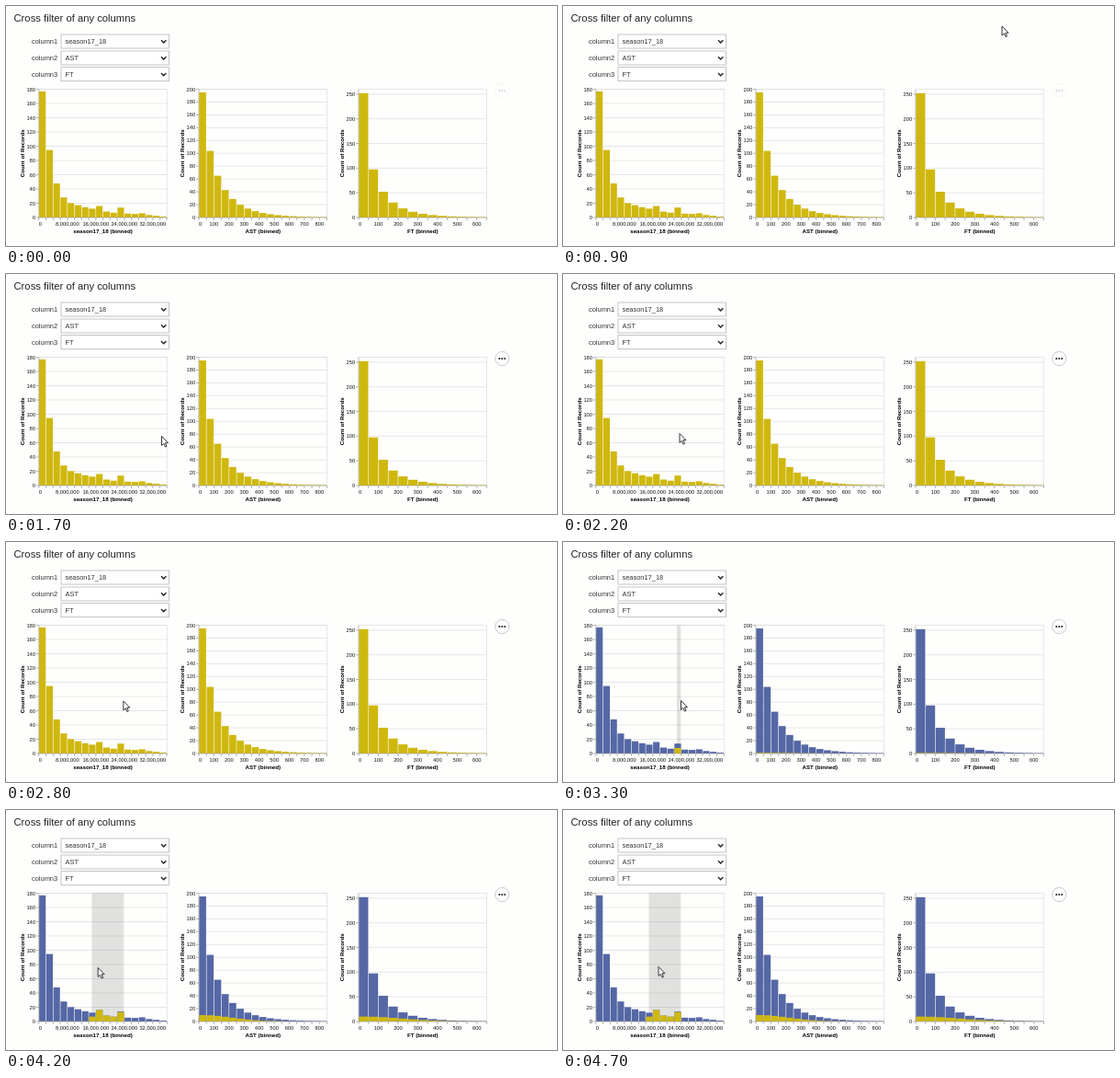
An HTML page that plays this animation: 600x261 px, repeating every 5300 ms.

```html
<!DOCTYPE html>
<html lang="en">
<head>
<meta charset="utf-8">
<title>Cross filter</title>
<style>
html, body { margin: 0; width: 100%; height: 100%; overflow: hidden; background: #fefefd; }
svg { display: block; width: 100%; height: 100%; font-family: "Liberation Sans", Arial, sans-serif; }
.title { font-size: 11.25px; fill: #222; }
.form { font-size: 7.45px; fill: #333; }
.axis { font-size: 5.75px; fill: #111; }
.name { font-size: 6.2px; font-weight: bold; fill: #000; text-anchor: middle; }
</style>
</head>
<body>
<svg id="stage" viewBox="0 0 600 261"></svg>
<script>
const LOOP = 5300, SIZE = 139.5, TOP = 90.5, BASE = TOP + SIZE;
const GOLD = '#cfb80d', BLUE = '#5567a5';
const BRUSH = { begin: 3300, finish: 3500, from: 124, to: 93.5, end: 128.3 };

const decay = (peak, rate, power) => i => peak * Math.exp(-rate * i ** power);

// a steep fall, a slow slope and a ripple around the tenth bin
const salaries = i => decay(155, 0.74, 1.2)(i) + 22 * (1 - i / 18) +
  6 * Math.cos((i - 2) * Math.PI * 2 / 3) * Math.exp(-(((i - 10) / 3) ** 2));

const charts = [
  { name: 'season17_18', left: 35.8, max: 180, yStep: 20, bin: 2e6, count: 18, labelEvery: 4, value: salaries },
  { name: 'AST', left: 210, max: 200, yStep: 20, bin: 50, count: 17, labelEvery: 2, value: decay(195, 0.63, 0.8) },
  { name: 'FT', left: 384, max: 260, yStep: 50, bin: 50, count: 13, labelEvery: 2, value: decay(252, 0.95, 0.73) }
];

// time, x, y
const pointerPath = [
  [900, 478, 22], [1200, 341, 97.5], [1400, 226, 160], [1700, 169.5, 176.5], [2200, 127, 173.5],
  [3300, 128.5, 172.5], [3500, 99, 171.5], [4400, 100.5, 171.5], [4700, 104, 170.5]
];

const clamp = v => Math.min(1, Math.max(0, v));
const mix = (a, b, k) => a + (b - a) * k;
const rect = (x, y, w, h, attrs) => `<rect x="${x}" y="${y}" width="${w}" height="${h}" ${attrs}/>`;
const line = (d, color, width = 0.7) => `<path d="${d}" fill="none" stroke="${color}" stroke-width="${width}"/>`;
const text = (x, y, cls, label, attrs = '') => `<text x="${x}" y="${y}" class="${cls}" ${attrs}>${label}</text>`;

function dropdown(label, value, y) {
  return text(28, y + 10.2, 'form', label) +
    rect(60, y, 117.6, 15, 'fill="#fff" stroke="#aaa" stroke-width=".7"') +
    text(64.5, y + 10.2, 'form', value) +
    line(`M169 ${y + 6.2}l2.7 2.8l2.7-2.8`, '#222', 1.4);
}

function frame({ left, max, yStep }) {
  let out = rect(left, TOP, SIZE, SIZE, 'fill="none" stroke="#ddd" stroke-width=".7"');
  for (let v = 0; v <= max; v += yStep) {
    out += line(`M${left} ${BASE - v / max * SIZE}h${SIZE}`, '#ddd');
  }
  return out;
}

function axes({ name, left, max, yStep, bin, count, labelEvery }) {
  let out = line(`M${left} ${TOP}V${BASE}h${SIZE}`, '#999', 0.5);
  for (let v = 0; v <= max; v += yStep) {
    const y = BASE - v / max * SIZE;
    out += line(`M${left} ${y}h-3`, '#999') +
      text(left - 3.8, y + 2, 'axis', v, 'text-anchor="end"');
  }
  for (let i = 0; i <= count; i++) {
    const x = left + i * SIZE / count;
    out += line(`M${x} ${BASE}v3`, '#999');
    if (i % labelEvery === 0 && i < count) {
      out += text(x, 239, 'axis', (i * bin).toLocaleString('en-US'), `text-anchor="${i ? 'middle' : 'start'}"`);
    }
  }
  return out + text(left + SIZE / 2, 246.6, 'name', `${name} (binned)`) +
    text(0, 0, 'name', 'Count of Records', `transform="translate(${left - 16} ${TOP + SIZE / 2}) rotate(-90)"`);
}

function bars({ left, max, count }, value, color) {
  const step = SIZE / count;
  return Array.from({ length: count }, (_, i) => {
    const height = value(i) / max * SIZE;
    return rect(left + i * step + 0.3, BASE - height, step - 0.6, height, `fill="${color}"`);
  }).join('');
}

// brushed bins count by their overlap; the other charts get a bell-shaped share
function selected(chart, start) {
  const step = SIZE / chart.count;
  const share = (BRUSH.end - start) / (BRUSH.end - BRUSH.to);
  if (chart !== charts[0]) {
    return i => Math.min(chart.value(i), 10 * share * Math.exp(-((i / 5.5) ** 2)));
  }
  return i => {
    const x = chart.left + i * step;
    return chart.value(i) * clamp((Math.min(BRUSH.end, x + step) - Math.max(start, x)) / step);
  };
}

const stage = document.getElementById('stage');
stage.innerHTML =
  text(8.5, 17, 'title', 'Cross filter of any columns') +
  dropdown('column1', 'season17_18', 31) +
  dropdown('column2', 'AST', 49) +
  dropdown('column3', 'FT', 66.7) +
  charts.map(frame).join('') +
  '<g id="marks"></g>' +
  charts.map(axes).join('') +
  `<g id="menu">
    <circle cx="540.3" cy="92" r="7.6" fill="#fff" stroke="#b4b4b4" stroke-width=".7"/>
    ${[-3, 0, 3].map(dx => `<circle cx="${540.3 + dx}" cy="92" r="1.05" fill="#222"/>`).join('')}
  </g>
  <path id="pointer" d="M0 0V10L2.3 7.9L4 11.6L5.5 10.9L3.9 7.2H7Z" fill="#fff" stroke="#222" stroke-width=".9" stroke-linejoin="round"/>`;

const marks = document.getElementById('marks');
const menu = document.getElementById('menu');
const pointer = document.getElementById('pointer');

function drawMarks(time) {
  if (time < BRUSH.begin) {
    marks.innerHTML = charts.map(c => bars(c, c.value, GOLD)).join('');
    return;
  }
  const progress = clamp((time - BRUSH.begin) / (BRUSH.finish - BRUSH.begin));
  const start = mix(BRUSH.from, BRUSH.to, progress);
  marks.innerHTML =
    rect(start, TOP, BRUSH.end - start, SIZE, 'fill="#333" fill-opacity=".14"') +
    charts.map(c => bars(c, c.value, BLUE) + bars(c, selected(c, start), GOLD)).join('');
}

function drawPointer(time) {
  const next = pointerPath.findIndex(p => p[0] > time);
  pointer.setAttribute('visibility', next ? 'visible' : 'hidden');
  if (!next) return;
  const b = pointerPath.at(next);
  const a = next < 0 ? b : pointerPath[next - 1];
  const k = a === b ? 0 : (time - a[0]) / (b[0] - a[0]);
  pointer.setAttribute('transform', `translate(${mix(a[1], b[1], k)} ${mix(a[2], b[2], k)})`);
}

let shownTime;

function draw(now) {
  const time = Math.floor(now % LOOP / 100) * 100;
  if (time === shownTime) return;
  shownTime = time;
  drawMarks(time);
  drawPointer(time);
  menu.setAttribute('opacity', mix(0.17, 1, clamp((time - 1000) / 400) ** 1.7));
}

const begin = performance.now();
function tick() {
  draw(performance.now() - begin);
  requestAnimationFrame(tick);
}
tick();
</script>
</body>
</html>
```
